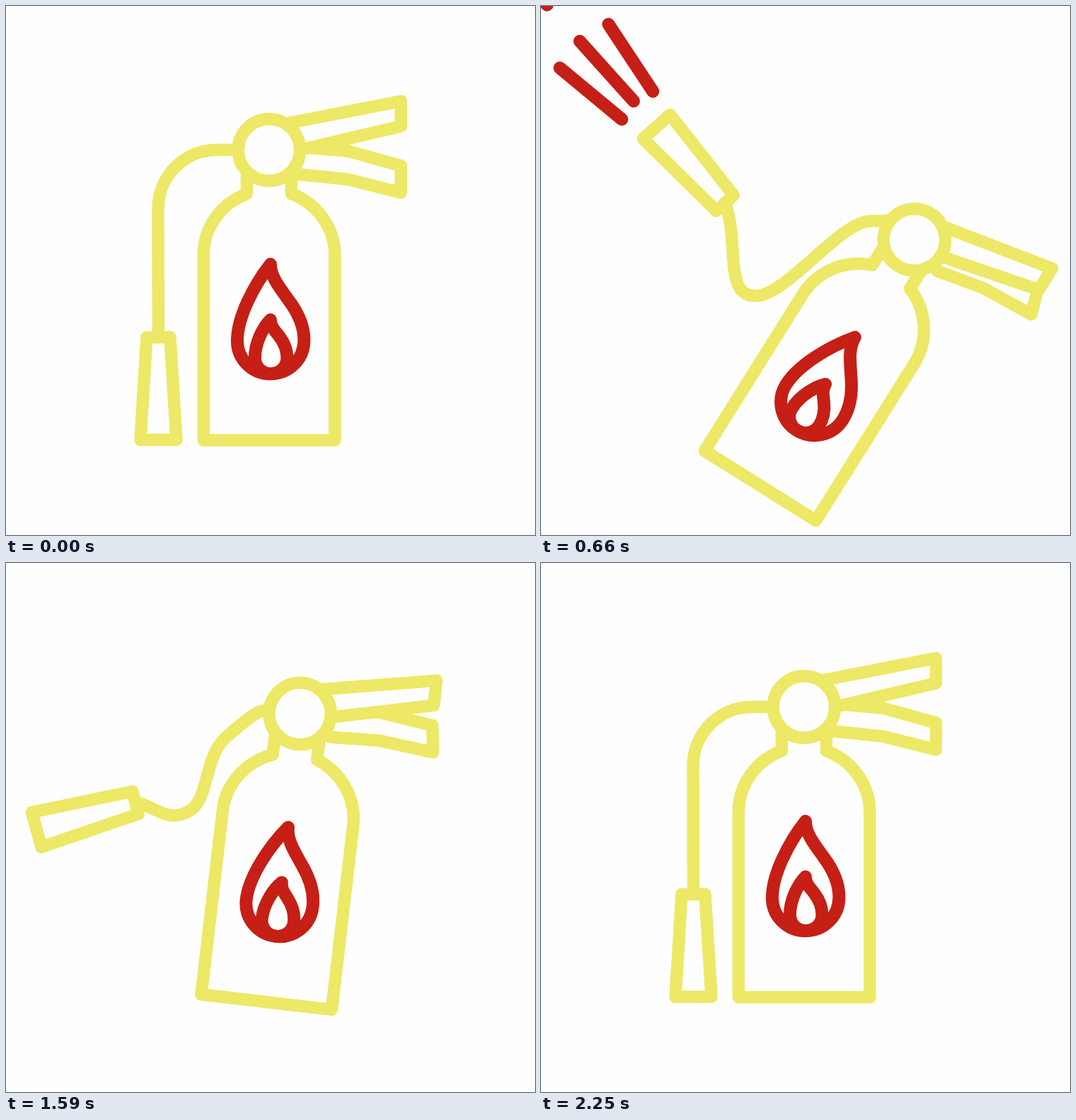
These frames come from a looping animation (748 by 748 pixels, 2340 ms). An HTML page:

```html
<!DOCTYPE html>
<html lang="en">
<head>
<meta charset="utf-8">
<title>Fire extinguisher</title>
<style>
  html, body { margin: 0; width: 100%; height: 100%; overflow: hidden; background: #fefefe; }
  svg { display: block; width: 100%; height: 100%; }
  path, circle { fill: none; stroke: #ede866; stroke-width: 17.5; stroke-linecap: round; stroke-linejoin: round; }
  .solid { fill: #fefefe; }
  .red path { stroke: #c51f16; stroke-width: 18; }
  #spray path { stroke-dasharray: 114 69; }
</style>
</head>
<body>
<svg viewBox="0 0 748 748">
  <g id="spray" class="red">
    <path transform="translate(-23.4 0) rotate(8.45)"/>
    <path/>
    <path transform="translate(23.4 0) rotate(-8.45)"/>
  </g>
  <path id="hose"/>
  <path id="nozzle" d="M-16.5 .5H16.5L25.5 145.5H-25.5Z"/>
  <g id="body">
    <path d="M-31.5 35V62C-66 75 -92.7 108 -92.7 149V410.5H93V149C93 108 66 75 31.5 62V35"/>
    <path id="lever" d="M45 -4L111 1.5L186.5 22.5V60.5L111 41.5L42 34.5"/>
    <path class="solid" d="M28 -38L186.5 -69V-33.5L52 -2"/>
    <circle class="solid" r="43.7"/>
    <g class="red" transform="translate(-372 -203)">
      <path d="M374 364.5C350 395 327 440 327 473C327 499 348 519.7 374 519.7C400 519.7 421.5 499 421.5 472C421.5 450 412 432 400 416C388 399 374 383 374 364.5Z"/>
      <path d="M374 443C364 453 352 475 352 497C352 510 362 519.5 374.5 519.5C387 519.5 397.5 510 397.5 497C397.5 485 393 475 386 466C380 458 374 453 374 443Z"/>
    </g>
  </g>
</svg>
<script>
const LOOP = 2340, STEP = 30;
const TIMES = [0, 420, 660, 1050, 1380, 1620, 1800, 2250];

// Smooth monotone curve through one value per time
function curve(vals) {
  const n = TIMES.length;
  const rate = i => (vals[i + 1] - vals[i]) / (TIMES[i + 1] - TIMES[i]);
  const slope = i => {
    if (i === 0 || i === n - 1) return 0;
    const a = rate(i - 1), b = rate(i);
    return a * b > 0 ? 2 * a * b / (a + b) : 0;
  };
  return t => {
    if (t >= TIMES[n - 1]) return vals[n - 1];
    let i = 0;
    while (t >= TIMES[i + 1]) i++;
    const h = TIMES[i + 1] - TIMES[i], u = (t - TIMES[i]) / h, v = 1 - u;
    return vals[i] * v * v * (1 + 2 * u) + vals[i + 1] * u * u * (3 - 2 * u)
      + h * u * v * (slope(i) * v - slope(i + 1) * u);
  };
}

// Rows are poses; the last pose equals the first
function track(rows) {
  const all = [...rows, rows[0]];
  const curves = rows[0].map((_, c) => curve(all.map(r => r[c])));
  return t => curves.map(f => f(t));
}

// x, y, angle, lower lever angle
const bodyAt = track([
  [372, 203.5, 0, 0],
  [523.5, 345, 36.7, -2],
  [528, 330.5, 32.1, -17.5],
  [531.5, 300, 24, -25.4],
  [522.5, 293.5, 22.3, -25.4],
  [401, 202, 4.5, -6],
  [336, 153.5, -5, 5]
]);

// x, y, angle
const nozzleAt = track([
  [215.5, 468, 0],
  [227, 231.5, 144.6],
  [260.5, 279, 138.1],
  [276.5, 300.5, 129.7],
  [266.5, 312, 126.2],
  [180, 345, 65],
  [226, 437.5, -7.7]
]);

// two bends with their handles, then the handle at the nozzle
const hoseAt = track([
  [298, 203.5, -46, 0, 215, 287, 0, 46, 0, -50],
  [437, 310, -46, 0, 310, 336, -42, 0, 8, 50],
  [467, 304, -45, 0, 303, 410, -45, 0, 20, 55],
  [478, 283, -45, 0, 322, 440, -33, 0, 33, 25],
  [467, 277, -46, 0, 327, 446, -33, 0, 26, 18],
  [295, 240, -30, 30, 255, 340, -30, 20, 25, 0],
  [244, 190, 0, 24, 271, 300, 0, 40, 4, -35]
]);

const sprayAt = curve([-591, 49, 415, 997, 1521, 1887, 2161, 2848]);
const SPEED = 1.52, MOUTH = 35, SPRAY_ON = 300, SPRAY_OFF = 1420;

const $ = id => document.getElementById(id);
const [body, lever, hose, nozzle, spray] = ["body", "lever", "hose", "nozzle", "spray"].map($);
const jets = [...spray.children];
const place = (el, x, y, a) => el.setAttribute("transform", `translate(${x} ${y}) rotate(${a})`);

function drawHose(t, x, y, angle, nx, ny) {
  const [px, py, pu, pv, qx, qy, qu, qv, bu, bv] = hoseAt(t);
  const r = angle * Math.PI / 180, c = Math.cos(r), s = Math.sin(r);
  hose.setAttribute("d", `M${x - 44 * c} ${y - 44 * s}`
    + `C${x - 58 * c} ${y - 58 * s} ${px - pu} ${py - pv} ${px} ${py}`
    + `C${px + pu} ${py + pv} ${qx - qu} ${qy - qv} ${qx} ${qy}`
    + `C${qx + qu} ${qy + qv} ${nx + bu} ${ny + bv} ${nx} ${ny}`);
}

function drawSpray(t, x, y, angle) {
  const on = t > SPRAY_ON && t < 1600;
  spray.style.display = on ? "" : "none";
  if (!on) return;
  spray.setAttribute("transform", `translate(${x} ${y}) rotate(${angle}) translate(0 145)`);
  const from = MOUTH + Math.max(0, t - SPRAY_OFF) * SPEED;
  const to = Math.min(700, MOUTH + (t - SPRAY_ON) * SPEED);
  jets.forEach((jet, i) => {
    const lag = i === 1 ? 0 : 7.5;
    jet.setAttribute("d", `M0 ${from}V${to}`);
    jet.style.strokeDashoffset = from - sprayAt(t) + lag;
  });
}

function draw(t) {
  const [x, y, angle, squeeze] = bodyAt(t);
  const [nx, ny, turn] = nozzleAt(t);
  place(body, x, y, angle);
  place(lever, 0, 0, squeeze);
  place(nozzle, nx, ny, turn);
  drawHose(t, x, y, angle, nx, ny);
  drawSpray(t, nx, ny, turn);
}

const start = performance.now();
function tick() {
  const t = (performance.now() - start) % LOOP;
  draw(Math.floor(t / STEP) * STEP);
  requestAnimationFrame(tick);
}
tick();
</script>
</body>
</html>
```
